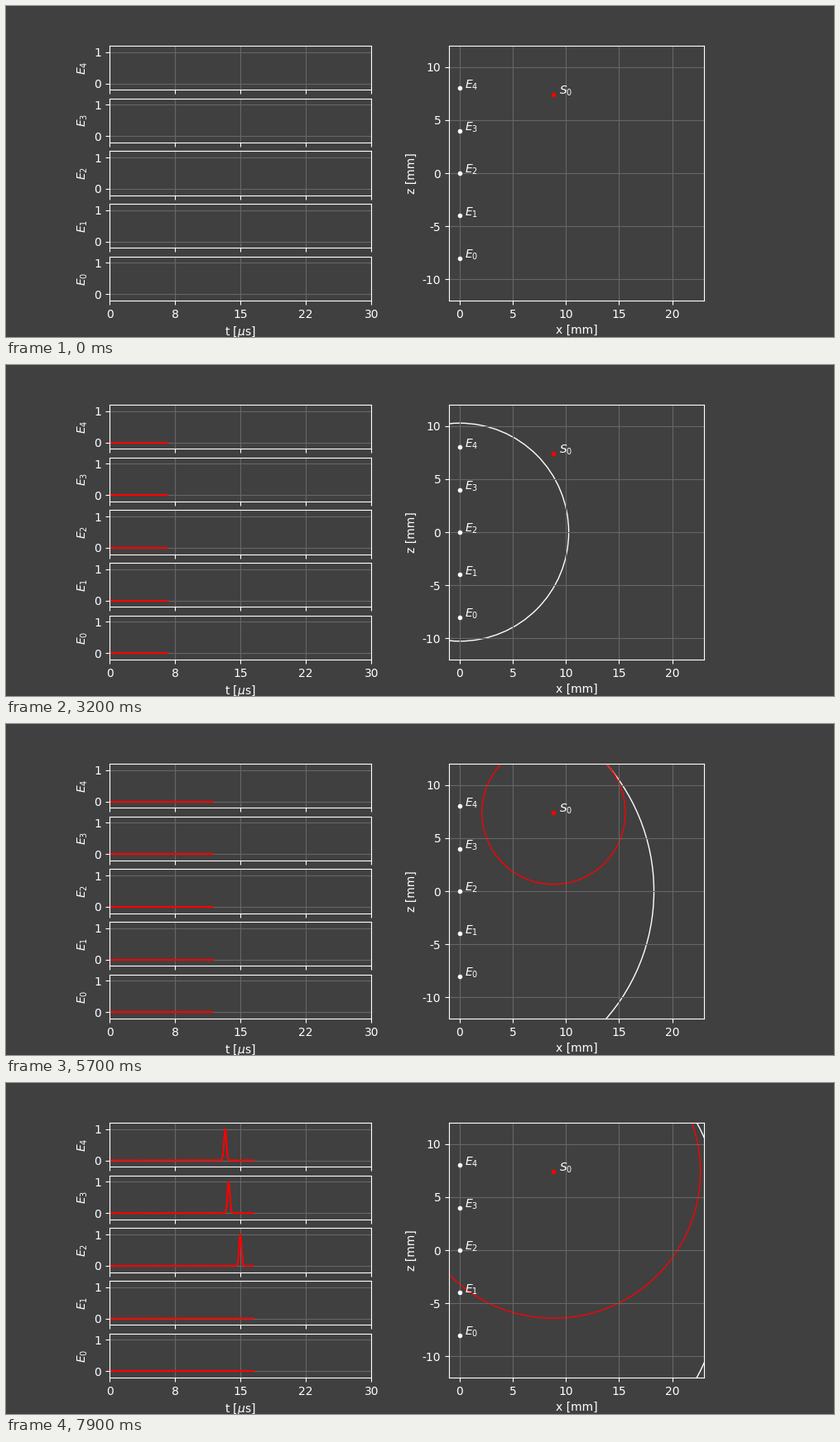
Animation, 1000 px wide and 400 px high, one loop 8 s. Source, as a matplotlib script:

```python
import numpy as np
import matplotlib.pyplot as plt
from matplotlib.animation import FuncAnimation
from matplotlib.patches import Circle
from matplotlib.ticker import FormatStrFormatter

W, H, DPI = 1000, 400, 100
FRAMES, INTERVAL = 80, 100
BG, GRID = "#404040", "#666666"

SPEED = 1.54            # mm per microsecond
DT = 30 / 144           # microseconds per frame
SUB = 10                # trace samples per frame
SIGMA = 0.137           # pulse width in microseconds
ELEMENTS = [(0, z) for z in (-8, -4, 0, 4, 8)]
EMITTER = ELEMENTS[2]
SCATTERER = (8.85, 7.4)

plt.rcParams.update({
    "font.family": "DejaVu Sans", "font.size": 10,
    "text.color": "white", "axes.labelcolor": "white",
    "axes.edgecolor": "white", "axes.facecolor": BG,
    "xtick.color": "white", "ytick.color": "white",
    "grid.color": GRID, "grid.linewidth": 0.8,
})

fig = plt.figure(figsize=(W / DPI, H / DPI), dpi=DPI, facecolor=BG)
whole = FormatStrFormatter("%.0f")


def add_panel(left, top, width, height, xlim, ylim, xticks, yticks):
    box = [left / W, 1 - (top + height) / H, width / W, height / H]
    ax = fig.add_axes(box, xlim=xlim, ylim=ylim, xticks=xticks, yticks=yticks)
    ax.xaxis.set_major_formatter(whole)
    ax.yaxis.set_major_formatter(whole)
    ax.grid(True)
    return ax


def add_point(ax, pos, color, label):
    ax.plot(*pos, ".", color=color)
    ax.text(pos[0] + 0.5, pos[1], label)


def add_wave(ax, center, color):
    wave = Circle(center, 0, fill=False, edgecolor=color, linewidth=1)
    ax.add_patch(wave)
    return wave


def set_radius(wave, r):
    wave.set_radius(max(r, 0))
    wave.set_visible(r > 0)


# Received signals, one panel per element, the last element on top
reach = np.hypot(SCATTERER[0] - EMITTER[0], SCATTERER[1] - EMITTER[1])
time = np.arange(FRAMES * SUB) * DT / SUB
row_h = 308 / 5.8
traces = []
for i, (x, z) in enumerate(ELEMENTS):
    ax = add_panel(125, 48 + (4 - i) * row_h * 1.2, 316.3, row_h,
                   (0, 30), (-0.2, 1.2), np.linspace(0, 30, 5), [0, 1])
    ax.set_ylabel(f"$E_{i}$")
    if i == 0:
        ax.set_xlabel(r"t [$\mu$s]")
    else:
        ax.tick_params(labelbottom=False)
    back = np.hypot(SCATTERER[0] - x, SCATTERER[1] - z)
    arrival = (reach + back) / SPEED
    pulse = np.exp(-0.5 * ((time - arrival) / SIGMA) ** 2)
    line, = ax.plot([], [], color="red", linewidth=1.5)
    traces.append((line, pulse))

# Wave propagation
field = add_panel(535, 48, 308, 308, (-1, 23), (-12, 12),
                  range(0, 21, 5), range(-10, 11, 5))
field.set_xlabel("x [mm]")
field.set_ylabel("z [mm]")
for i, pos in enumerate(ELEMENTS):
    add_point(field, pos, "white", f"$E_{i}$")
add_point(field, SCATTERER, "red", "$S_0$")
sent = add_wave(field, EMITTER, "white")
echo = add_wave(field, SCATTERER, "red")


def update(frame):
    n = frame * SUB + 1
    for line, pulse in traces:
        line.set_data(time[:n], pulse[:n])
    path = SPEED * DT * frame
    set_radius(sent, path)
    set_radius(echo, path - reach)
    return [line for line, _ in traces] + [sent, echo]


anim = FuncAnimation(fig, update, frames=FRAMES, interval=INTERVAL,
                     repeat=True, repeat_delay=0, blit=False)
plt.show()
```
